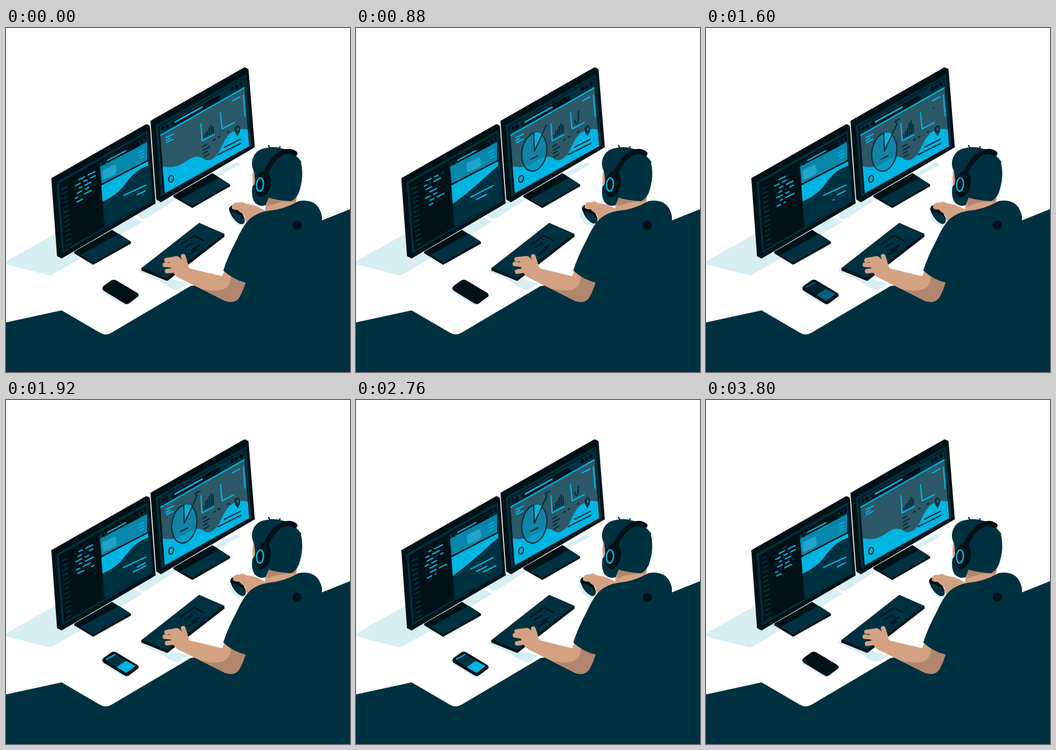
These frames come from a looping animation (600 px wide and 600 px high, 3.84 s). An HTML page:

```html
<!DOCTYPE html>
<html lang="en">
<head>
<meta charset="utf-8">
<title>Desk</title>
<style>
html, body { margin: 0; width: 100%; height: 100%; overflow: hidden; background: #fff; }
svg { display: block; width: 100%; height: 100%; }
.navy { fill: #003140; }
.black { fill: #001217; }
.cyan { fill: #00b5e2; }
.shade { fill: #d7eef3; }
.skin { fill: #d4a283; }
.tan { fill: #b0876d; }
.l { fill: none; stroke-width: 2.2; stroke-linecap: round; stroke-linejoin: round; }
.lc { stroke: #00b5e2; }
.ln { stroke: #003140; }
.lb { stroke: #001217; }
.finger { fill: none; stroke: #d4a283; stroke-width: 8; stroke-linecap: round; stroke-linejoin: round; }
</style>
</head>
<body>
<svg viewBox="0 0 600 600">
  <defs>
    <clipPath id="codeClip"><path d="M112 272L162 240L167 322L118 348Z"/></clipPath>
    <clipPath id="gutterClip"><path d="M94 275L116 263L124 378L101 391Z"/></clipPath>
    <clipPath id="pageClip"><path d="M163 235L245 189L254 300L172 346Z"/></clipPath>
    <clipPath id="dashClip"><path d="M268 172L415 88L424 206L277 288Z"/></clipPath>
  </defs>

  <!-- desk and shadows -->
  <path class="shade" d="M0 407L84 360L190 330L222 330L238 338L83 429Q77 433 70 430L0 412Z"/>
  <path class="shade" d="M229 325L262 300L300 296L250 329Q242 334 235 332ZM360 256L402 234L409 238L383 252L365 262Z"/>
  <path class="shade" d="M231 422L240 416L290 438L318 446L300 457Q290 458 268 441L234 426ZM388 319L420 338L417 347Q402 345 396 337Q390 329 388 319Z"/>
  <path class="navy" d="M0 513.5L97 492.5L163 531Q173 537.5 184 531.5L322 450L400 440L550 336L600 316V600H0Z"/>

  <!-- left monitor -->
  <path class="black" d="M119 390L185 352L218 373V376L152 413L119 393Z"/>
  <path class="navy" d="M130 396L197 359L217 372L152 409Z"/>
  <path class="black" d="M79 262L244 168Q246 167 251 171L261 306L97 402L89 398Z"/>
  <path class="navy" d="M88 269L247 179L256 302L98 393Z"/>
  <path class="black" d="M92 271L245 184L254 300L101 388Z"/>
  <g clip-path="url(#gutterClip)"><path id="gutter" class="l ln"/></g>
  <g clip-path="url(#codeClip)">
    <path id="codeDim" class="l ln"/>
    <path id="codeLit" class="l lc"/>
  </g>
  <g clip-path="url(#pageClip)">
    <path class="navy" d="M160 230L246 180L260 310L172 350Z"/>
    <path fill="#0787ab" d="M164 242L246 199V231L167 273Z"/>
    <path class="l lb" style="stroke-width:8" d="M178 230L230 203"/>
    <path class="l lc" d="M177 231L209 214"/>
    <path class="l lb" style="stroke-width:6" d="M170 235v1M237 197v1M244 193v1"/>
    <path class="l lc" style="stroke-width:1.7" d="M231 218L240 213M232 223L240 219M233 228L240 224"/>
    <path id="card" fill="#21a3cb" d="M171 247L188 239Q192 237 192 242L193 251Q193 254 190 256L173 264Q169 266 169 261L168 252Q168 249 171 247Z"/>
    <path id="hill" class="cyan"/>
    <path class="l lb" d="M166 273L248 231"/>
    <path id="copy" class="l lc"/>
  </g>

  <!-- right monitor -->
  <path class="black" d="M292 292L360 253L391 273V276L325 314L292 295Z"/>
  <path class="navy" d="M304 299L372 261L390 273L325 310Z"/>
  <path class="black" d="M252 162L415 69Q417 68 423 72L434 208L270 304L262 299Z"/>
  <path class="navy" d="M261 170L419 81L428 205L271 294Z"/>
  <path class="black" d="M265 172L416 86L425 204L274 289Z"/>
  <g clip-path="url(#dashClip)">
    <path class="navy" d="M264 170L420 80L420 103L268 189Z"/>
    <path fill="#2c5868" d="M268 189L420 101L428 208L276 292Z"/>
    <path class="cyan" d="M270 240C288 246 303 241 315 232C326 223 338 222 346 229C354 234 364 228 371 217C379 203 384 184 400 179Q412 173 426 179L430 210L270 296Z"/>
    <path class="l lc" d="M268 188L418 103"/>
  </g>
  <path class="l lb" style="stroke-width:9" d="M292 167L370 123"/>
  <path class="l lc" style="stroke-width:2.6" d="M295 164L342 138"/>
  <path class="l lb" style="stroke-width:6" d="M274 174v2M281 171v2M395 105v2M402 102v2M410 97v2"/>
  <path class="l lc" d="M279 191L292 185M279 196L286 192M280 200L291 194M395 127L408 120M414 117L417 154M340 167L342 197L363 186M374 148L377 176L398 165"/>
  <path class="l ln" d="M343 207L350 203M344 213L355 207M344 219L351 215M345 225L354 220M362 196L365 194M370 191L373 189M386 182L389 180M370 221L410 201M381 208L409 194M390 211L408 202"/>
  <path class="navy" fill-rule="evenodd" d="M404 189C401 184 397 179 399 174C402 168 408 169 408 175C409 181 406 184 404 189ZM404 173a2 3 0 1 0 .1 0Z"/>
  <ellipse class="l ln" cx="288" cy="263" rx="4" ry="6" transform="rotate(15 288 263)"/>
  <path id="bars" class="l ln" style="stroke-width:2.5;stroke-linecap:butt"/>
  <path id="trend" class="l ln" pathLength="1" d="M381 160Q383 167 385 167C389 166 387 143 389 141C392 137 391 146 394 146Q395 146 397 139"/>
  <g id="pie">
    <ellipse cx="311" cy="216" rx="21.5" ry="34" fill="#0a94bb" fill-opacity=".72" stroke="#003140" stroke-width="2.2" transform="rotate(10 311 216)"/>
    <path class="cyan" d="M311 215L310 183Q319 180 325 186Z"/>
    <path class="l ln" d="M310 183L311 215L325 185M305 229L317 223"/>
  </g>
  <path id="lead" class="l ln" pathLength="1" d="M324 187L333 167L330 163L338 159"/>

  <!-- phone -->
  <path class="shade" d="M167 457L175 449L229 469L211 483Q207 484 202 481L169 461Z"/>
  <path class="black" d="M170 450L184 440Q188 438 192 440L229 462Q232 464 231 468L215 480Q211 483 206 480L170 458Q166 454 170 450Z"/>
  <g id="phoneOn">
    <path class="navy" d="M173 454L190 443L226 464L210 476Z"/>
    <path class="cyan" d="M193 466L209 455L226 464L210 476Z"/>
    <path class="l lc" d="M175 452L190 444"/>
  </g>

  <!-- keyboard -->
  <path class="black" d="M236 419L337 340L381 359V364L283 440Q281 442 278 440L236 423Z"/>
  <path class="navy" d="M238 418L337 340L380 359L281 436Z"/>
  <path class="l lb" d="M305 378L328 362L345 371M312 383L325 375M323 388L337 379M318 395L333 386"/>

  <!-- mouse and its hand -->
  <g id="mouse">
    <path class="black" d="M389 317Q389 309 399 309Q411 317 416 332Q418 343 409 342Q396 337 389 317Z"/>
    <path class="navy" d="M393 321Q404 321 415 333Q417 343 409 342Q398 338 393 321Z"/>
    <path class="skin" d="M394 311Q397 303 406 305Q411 301 417 306L433 309L456 320L430 346Q421 344 417 335Q417 328 413 324Q408 322 404 317Q399 318 394 315Z"/>
  </g>

  <!-- typing arm -->
  <g id="arm">
    <path class="skin" d="M315 418L377 433L382 421L420 444L408 468Q401 482 382 476L300 435Z"/>
    <path class="tan" d="M341 455Q358 459 374 457Q393 454 392 431L420 440L408 468Q401 482 382 476Z"/>
    <path class="skin" d="M285 404Q296 394 304 401L320 418L324 440L300 435Q288 428 285 404Z"/>
    <path id="fingers" class="finger"/>
  </g>

  <!-- person -->
  <path class="skin" d="M431 249H438V281L431 278Q429 265 431 249ZM453 290L508 292L505 311L480 322L452 320Z"/>
  <path class="tan" d="M455 297L506 297L504 303Q480 301 456 311Z"/>
  <path class="navy" d="M379 423Q386 400 402 370Q413 345 425 333Q438 322 456 319Q484 317 510 302Q544 296 551 328V340L600 330V600H330L405 480L418 444Q396 439 379 423Z"/>
  <path class="navy" d="M433 251Q426 238 431 226Q437 211 455 209Q468 206 481 210Q500 213 514 232Q520 255 513 280Q509 297 497 302Q475 301 458 296L453 309Q441 313 433 303Q427 292 430 276Q436 273 434 262Z"/>
  <path class="l ln" d="M458 205Q460 210 466 212M478 207L475 213M508 232Q511 235 514 233"/>
  <path class="l lb" style="stroke-width:9" d="M451 258Q461 230 481 218Q495 212 504 219"/>
  <ellipse class="black" cx="448" cy="272" rx="13.5" ry="23" transform="rotate(10 448 272)"/>
  <ellipse class="l lc" style="stroke-width:2.6" cx="443" cy="273" rx="6" ry="11.5" transform="rotate(5 443 273)"/>
  <circle class="black" cx="508" cy="344" r="8"/>
</svg>
<script>
const LOOP = 3840, HALF = LOOP / 2, STEP = 40;
const $ = id => document.getElementById(id);
const set = (id, name, value) => $(id).setAttribute(name, value);
const lerp = (a, b, k) => a + (b - a) * k;
const ease = (t, from, to) => {
  const k = Math.min(1, Math.max(0, (t - from) / (to - from)));
  return k * k * (3 - 2 * k);
};
const wave = (t, turns, shift = 0) => Math.sin(2 * Math.PI * turns * t / LOOP + shift);
const seg = (a, b, c, d) => `M${a.toFixed(2)} ${b.toFixed(2)}L${c.toFixed(2)} ${d.toFixed(2)}`;

// One character is two pixels: "=" lit, "-" dim
const CODE = [
  '--  ======  =======',
  ' =====  ====  =====',
  '--  ===  ====== ',
  '  =====  ====  ---',
  '=== --  =======',
  ' ======',
  '    ======= --',
  '=====  ====',
  '--  ====  =======',
  '   ====  --  ====',
  ' ======  ====',
  '--  ===  ========',
  ' ====  =======',
  '  ======  --- ===',
  '====  =====',
  '--  ======='
];
const ROW = 7.2, ROWS = 6, SLOPE = .5, ROW_MS = LOOP / CODE.length;

function drawCode(t) {
  const top = Math.floor(t / ROW_MS), part = (t % ROW_MS) / ROW_MS;
  const lift = ease(part, .65, 1);
  const out = { '=': '', '-': '' };
  for (let i = 0; i <= ROWS; i++) {
    const text = CODE[(top + i) % CODE.length];
    const limit = i === ROWS ? text.length * part : text.length;
    const down = (i - lift) * ROW;
    for (const m of text.matchAll(/=+|-+/g)) {
      if (m.index >= limit) continue;
      const u = m.index * 2 + 1;
      const v = Math.max(u, Math.min(m.index + m[0].length, limit) * 2 - 1);
      const x = 118 + down * .07, y = 269 + down;
      out[m[0][0]] += seg(x + u, y - u * SLOPE, x + v, y - v * SLOPE);
    }
  }
  set('codeLit', 'd', out['=']);
  set('codeDim', 'd', out['-']);

  let lines = '';
  for (let i = 0; i <= 13; i++) {
    const down = (i - lift) * 8.2;
    const x = 98 + down * .08, y = 281 + down;
    lines += seg(x, y, x + 8, y - 4);
  }
  set('gutter', 'd', lines);
}

function drawPage(t) {
  const h = t % HALF;
  const s = ease(h, 240, 720) - ease(h, 1290, 1470);
  set('card', 'transform', `translate(${25 * s} ${-13 * s})`);
  set('hill', 'd', `M166 275L248 232V240C${lerp(228, 235, s)} ${lerp(247, 251, s)} ${lerp(219, 222, s)} ${lerp(258, 264, s)} 211 ${lerp(268, 273, s)}C${lerp(202, 199, s)} ${lerp(281, 283, s)} ${lerp(190, 187, s)} ${lerp(293, 294, s)} 168 ${lerp(303, 307, s)}Z`);
  let copy = seg(lerp(205, 200, s), lerp(292, 295, s), lerp(244, 239, s), lerp(274, 275, s));
  copy += seg(lerp(229, 210, s), lerp(291, 299, s), lerp(243, 228, s), lerp(284, 290, s));
  const c = ease(t, 1560, 1840) - ease(t, 2840, 3120);
  if (c > 0) copy += seg(222, 300, 222 + 22 * c, 300 - 11 * c);
  set('copy', 'd', copy);
}

function trim(id, from, to) {
  const len = to - from;
  set(id, 'visibility', len > .001 ? 'visible' : 'hidden');
  set(id, 'stroke-dasharray', `${len} 3`);
  set(id, 'stroke-dashoffset', -from);
}

function drawDash(t) {
  const grow = ease(t, 120, 600) - ease(t, 3200, 3600);
  set('pie', 'visibility', grow > .001 ? 'visible' : 'hidden');
  set('pie', 'transform', `translate(311 216) scale(${grow}) translate(-311 -216)`);
  trim('lead', 0, ease(t, 600, 1120) - ease(t, 2840, 3200));

  const h = t % HALF;
  trim('trend', ease(h, 800, 1640), ease(h, 520, 1160));

  const swell = wave(t, .5) ** 2;
  let bars = '';
  [5, 8, 9, 13, 16, 12].forEach((size, i) => {
    const x = 345.5 + i * 3.2, y = 192 - i * 1.7;
    const high = size * (1 + .55 * swell) + 2 * swell * wave(t, 4, i * 1.3);
    bars += seg(x, y, x - .6, y - high);
  });
  set('bars', 'd', bars);
}

function drawHands(t) {
  const tap = [0, 1.6, 3.2, 4.8].map(p => 1.2 * (wave(t, 12, p) - Math.sin(p)));
  set('fingers', 'd',
    seg(280, 405 + tap[0], 298, 402) + seg(277, 413 + tap[1], 296, 414) +
    seg(281, 424 + tap[2], 300, 422) + seg(309, 398 + tap[3] * .6, 314, 414));
  set('arm', 'transform', `rotate(${.25 * wave(t, 6)} 400 450)`);

  const push = ease(t, 320, 800) - .6 * ease(t, 920, 1240) - .4 * ease(t, 2880, 3320);
  set('mouse', 'transform', `translate(${5 * push} ${-push})`);
  set('phoneOn', 'opacity', ease(t, 1480, 1720) - ease(t, 3480, 3720));
}

function render(t) {
  drawCode(t);
  drawPage(t);
  drawDash(t);
  drawHands(t);
}

const start = performance.now();
function tick() {
  const t = (performance.now() - start) % LOOP;
  render(Math.floor(t / STEP) * STEP);
  requestAnimationFrame(tick);
}
tick();
</script>
</body>
</html>
```
